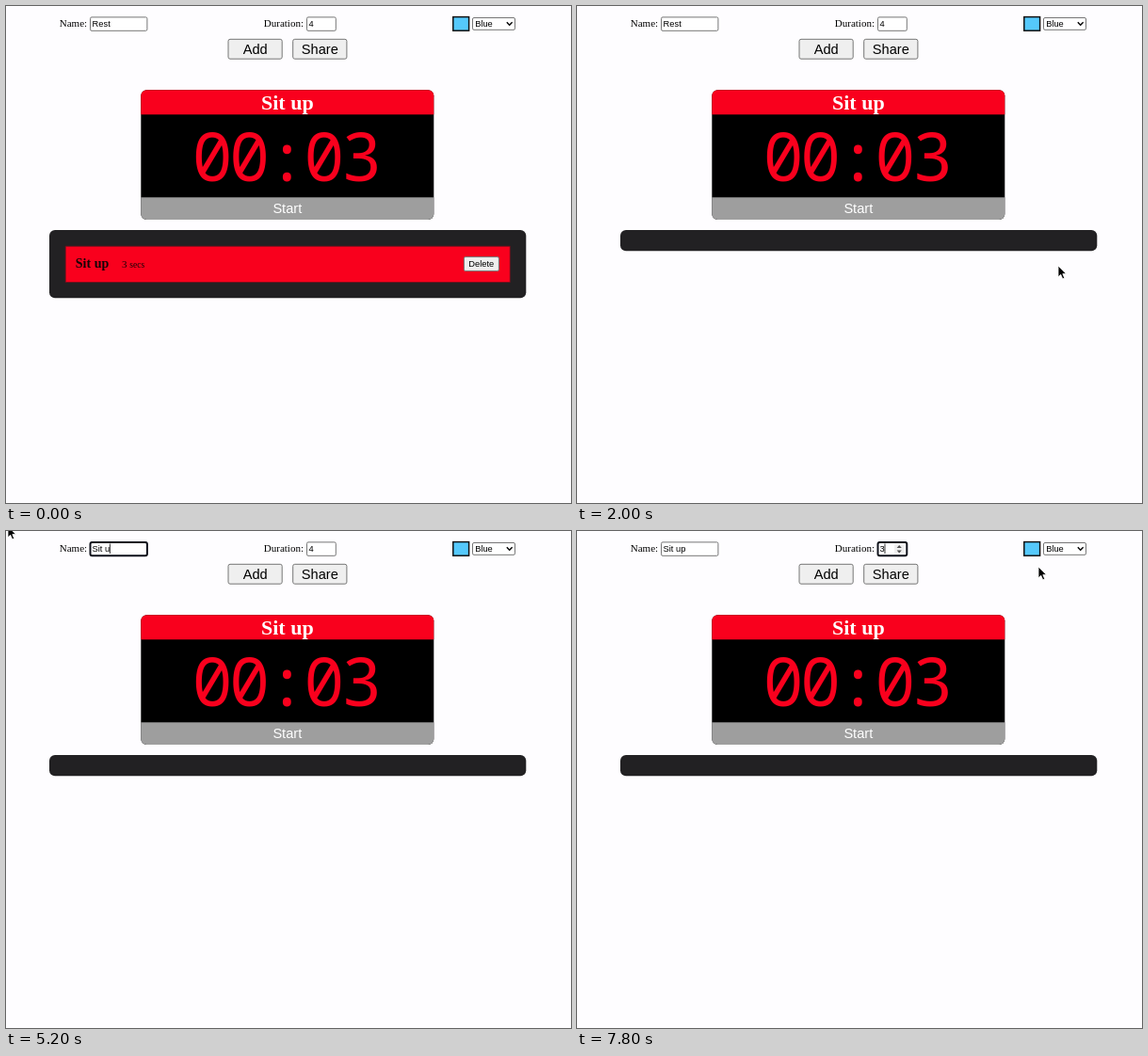
These frames come from a looping animation (600 by 528 pixels, 8 s). An HTML page:

```html
<!DOCTYPE html>
<html lang="en">
<head>
<meta charset="utf-8">
<title>Interval timer</title>
<style>
html, body { margin: 0; width: 100%; height: 100%; overflow: hidden; background: #fefdff; }
svg { display: block; width: 600px; height: 528px; }
text { font: 11px "Liberation Serif", Times, serif; white-space: pre; fill: #000; }
.ui { font: 9.3px "Liberation Sans", Arial, sans-serif; }
.big { font-size: 14.6px; }
.mid { text-anchor: middle; }
.head { font-size: 22px; font-weight: bold; fill: #fff; }
.item { font-size: 14px; font-weight: bold; fill: #160306; }
.clock { font: 72px "Noto Sans Mono", monospace; letter-spacing: -3.6px; }
.red { fill: #f9001d; }
.box { fill: #fff; stroke: #767676; }
.btn { fill: #efefef; stroke: #767676; }
.focus { fill: none; stroke: #10131c; stroke-width: 2; }
.mark { fill: #6592e0; }
</style>
</head>
<body>
<svg viewBox="0 0 600 528">
  <text x="56.8" y="22">Name:</text>
  <rect class="box" x="89.5" y="11.9" width="60.4" height="14.4" rx="1.5"/>
  <g id="name">
    <rect class="focus" x="89.5" y="11.9" width="60.4" height="14.4" rx="2"/>
    <rect class="mark" x="91" y="13.2" width="20.3" height="11.3"/>
    <text class="ui" x="91.6" y="22"></text>
    <path class="caret" stroke="#000" stroke-width=".8"/>
  </g>

  <text x="273.8" y="22">Duration:</text>
  <rect class="box" x="319.5" y="11.9" width="30.8" height="14.4" rx="1.5"/>
  <g id="dur">
    <rect class="focus" x="319.5" y="11.9" width="30.8" height="14.4" rx="2"/>
    <rect class="mark" x="321.4" y="13.2" width="5.6" height="11.3"/>
    <text class="ui" x="321.6" y="22"></text>
    <path class="caret" stroke="#000" stroke-width=".8"/>
  </g>
  <g id="spin">
    <rect x="337" y="13.5" width="10.5" height="11.2" fill="#efefef"/>
    <path d="M339.6 18l2.6-3 2.6 3zM339.6 20.4l2.6 3 2.6-3z" fill="#505050"/>
  </g>

  <rect x="474.8" y="11.6" width="16.8" height="14.6" fill="#55c9fb" stroke="#111" stroke-width="1.5"/>
  <rect class="box" x="495.5" y="12.5" width="45" height="12.8" rx="1.5"/>
  <text class="ui" x="498.2" y="22">Blue</text>
  <path d="M531.8 17.3l2.9 3 2.9-3" fill="none" stroke="#000" stroke-width="1.4"/>

  <rect class="btn" x="236" y="35.3" width="57.2" height="20.9" rx="2"/>
  <text class="ui big mid" x="264.7" y="50.5">Add</text>
  <rect class="btn" x="304.7" y="35.3" width="57.2" height="20.9" rx="2"/>
  <text class="ui big mid" x="333.3" y="50.5">Share</text>

  <clipPath id="card"><rect x="143.3" y="89.2" width="311" height="137.8" rx="6"/></clipPath>
  <g clip-path="url(#card)">
    <rect x="143" y="89" width="312" height="139"/>
    <rect class="red" x="143" y="89" width="312" height="26.3"/>
    <rect x="143" y="203.3" width="312" height="25" fill="#9e9e9e"/>
  </g>
  <text class="head mid" x="298.8" y="110">Sit up</text>
  <text class="clock red" x="197.5" y="186">00:03</text>
  <text class="ui big mid" x="298.8" y="220" style="fill:#fff">Start</text>

  <rect id="panel" x="46" y="238" width="506.3" rx="6" fill="#222123"/>
  <g id="row">
    <rect class="red" x="63.2" y="255.2" width="472" height="38.2" stroke="#70101c" stroke-width=".8"/>
    <text class="item" x="73.8" y="278">Sit up</text>
    <text x="123" y="278" style="fill:#160306">3 <tspan font-size="9.5" style="font-size:9.5px">secs</tspan></text>
    <rect class="btn" x="486.4" y="266.6" width="37" height="14.8" rx="1.5"/>
    <text class="ui mid" x="504.8" y="277">Delete</text>
  </g>

  <path id="arrow" d="M0 0v11.8l2.7-2.5 2 4.5 2-.9-1.9-4.3h3.7z" fill="#000" stroke="#fff" stroke-width=".8"/>
  <path id="beam" d="M-2-5.5q2 0 2 1.5v8q0 1.5-2 1.5M2-5.5q-2 0-2 1.5M2 5.5q-2 0-2-1.5M-1.3 1.5h2.6" fill="none" stroke="#222"/>
</svg>
<script>
const LOOP = 8000, STEP = 200;
const $ = id => document.getElementById(id);
const show = (el, on) => el.setAttribute('visibility', on ? 'visible' : 'hidden');

// Pointer keys: time, x, y
const path = [
  [800, 590, 174], [1000, 566, 212], [1200, 540, 246], [1400, 520, 268], [1600, 511, 276],
  [2000, 511, 276], [2200, 490, 256], [2600, 300, 112], [2800, 190, 40], [3000, 138, 18],
  [3200, 60, 8], [3400, 2, -5], [5600, 2, -5], [5800, 70, 5], [6000, 138, 13],
  [6200, 138, 13], [6400, 215, 17], [6600, 300, 20], [6800, 328, 20],
  [7000, 300, 60], [7200, 274, 94], [7400, 274, 94], [7600, 400, 36], [7800, 490, 38]
];

function pointer(t) {
  const i = path.findIndex(k => k[0] >= t);
  if (i < 1) return path[0].slice(1);
  const [t0, x0, y0] = path[i - 1], [t1, x1, y1] = path[i];
  const f = (t - t0) / (t1 - t0);
  return [x0 + (x1 - x0) * f, y0 + (y1 - y0) * f];
}

function typed(t) {
  if (t < 4200) return 'Rest';
  const n = t < 5000 ? 1 + (t - 4200) / STEP : t < 5200 ? 4 : t < 5400 ? 5 : 6;
  return 'Sit up'.slice(0, n);
}

function field(id, value, focused, selected) {
  const [ring, mark, text, caret] = $(id).children;
  text.textContent = value;
  text.style.fill = selected ? '#f2f5ff' : '#000';
  show(ring, focused);
  show(mark, selected);
  show(caret, focused && !selected);
  const x = +text.getAttribute('x') + text.getComputedTextLength() + .2;
  caret.setAttribute('d', `M${x} 13.5v10.5`);
}

function draw(t) {
  field('name', typed(t), t >= 3000 && t < 7000, t >= 3200 && t < 4200);
  field('dur', t < 7200 ? '4' : '3', t >= 7000, t >= 7000 && t < 7200);
  show($('spin'), t >= 6800);
  show($('row'), t < 2000);
  $('panel').setAttribute('height', t < 2000 ? 72.3 : 22.2);

  const [x, y] = pointer(t);
  const over = y > 11 && y < 27 && (x > 89 && x < 150 || x > 319 && x < 350);
  for (const id of ['arrow', 'beam']) {
    $(id).setAttribute('transform', `translate(${x} ${y})`);
    show($(id), t >= 800 && over === (id === 'beam'));
  }
}

function tick() {
  draw(Math.floor(performance.now() % LOOP / STEP) * STEP);
  requestAnimationFrame(tick);
}
tick();
</script>
</body>
</html>
```
